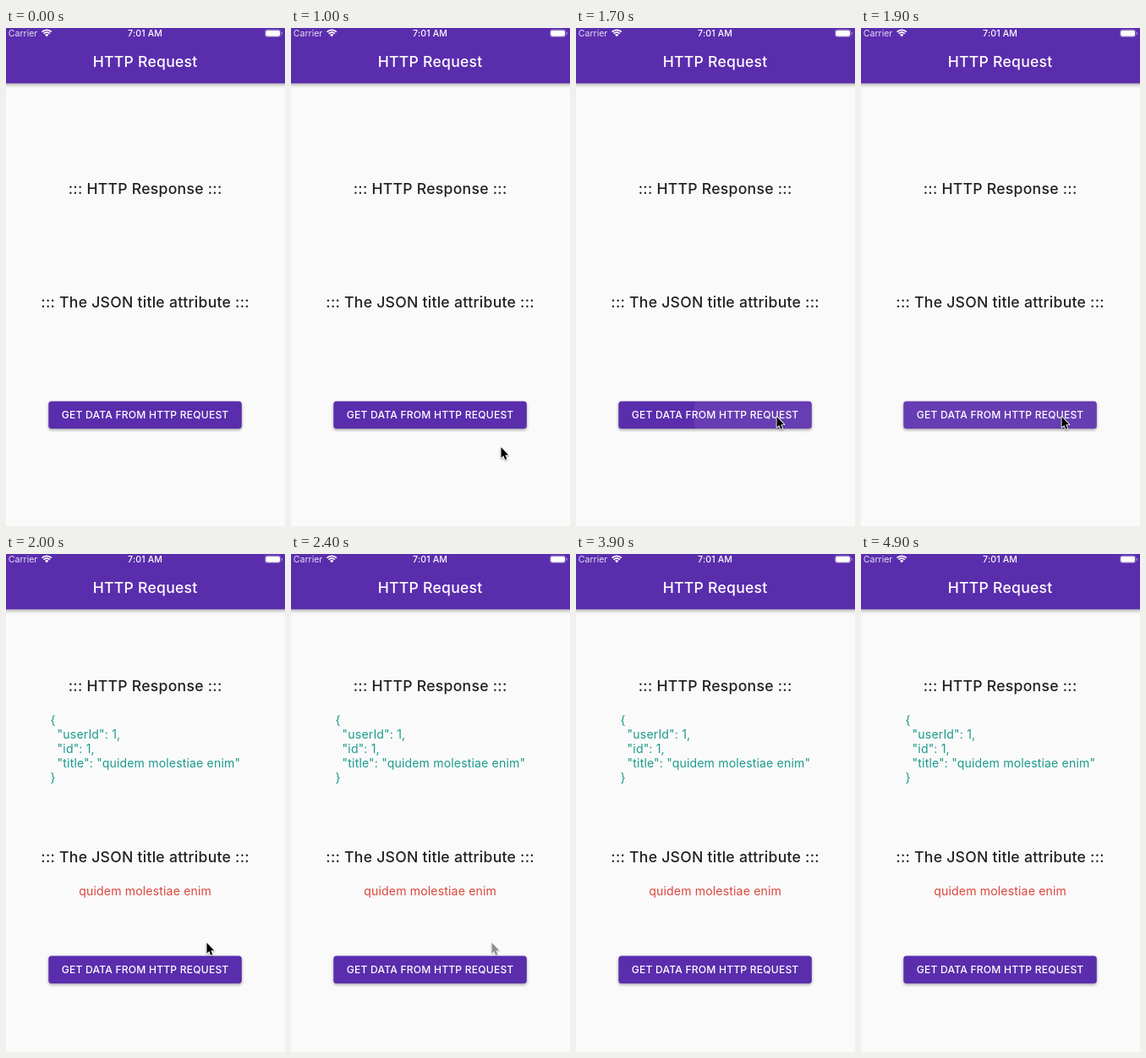
Write an HTML page with a canvas that moves like this. It is 330 px wide and 588 px high and loops after 5 s.

```html
<!DOCTYPE html>
<html lang="en">
<head>
<meta charset="utf-8">
<title>HTTP Request</title>
<style>
  html, body { margin: 0; width: 100%; height: 100%; overflow: hidden; background: #fafafa; }
  canvas { display: block; width: 330px; height: 588px; }
</style>
</head>
<body>
<canvas id="stage"></canvas>
<script>
const W = 330, H = 588, MID = 164.6, LOOP = 5000, STEP = 100;
const PURPLE = '#5a2dad', INK = '#212121', TEAL = '#1c9a8b', RED = '#dc463b';
const PRESS = 1500, RESPONSE = 2000;
const TITLE = 'quidem molestiae enim';
const JSON_LINES = ['{', '  "userId": 1,', '  "id": 1,', `  "title": "${TITLE}"`, '}'];

// Pointer tip as [time, x, y].
const POINTER = [
  [500, 342, 509], [600, 323, 509], [800, 282, 507], [900, 264, 503],
  [1000, 248.5, 495], [1100, 241.5, 478], [1200, 238.5, 465], [1300, 237.5, 459]
];

const canvas = document.getElementById('stage');
const ctx = canvas.getContext('2d');
const dpr = window.devicePixelRatio || 1;
canvas.width = W * dpr;
canvas.height = H * dpr;

const clamp = v => Math.max(0, Math.min(1, v));
const progress = (t, from, to) => clamp((t - from) / (to - from));

function text(str, x, y, { size, weight = 400, color = '#fff', spacing = 0, align = 'center' }) {
  ctx.font = `${weight} ${size}px Inter, "Open Sans", sans-serif`;
  ctx.letterSpacing = spacing + 'px';
  ctx.textAlign = align;
  ctx.fillStyle = color;
  ctx.fillText(str, x, y);
}

function box(x, y, w, h, r) {
  ctx.beginPath();
  ctx.roundRect(x, y, w, h, r);
}

function shadow(color, blur, dy) {
  ctx.shadowColor = color;
  ctx.shadowBlur = blur * dpr;
  ctx.shadowOffsetY = dy * dpr;
}

function drawWifi(x, y) {
  ctx.strokeStyle = ctx.fillStyle = '#fff';
  ctx.lineWidth = 1.7;
  for (const r of [5.2, 8]) {
    ctx.beginPath();
    ctx.arc(x, y, r, -Math.PI * 0.75, -Math.PI * 0.25);
    ctx.stroke();
  }
  ctx.beginPath();
  ctx.moveTo(x, y);
  ctx.arc(x, y, 3.1, -Math.PI * 0.75, -Math.PI * 0.25);
  ctx.fill();
}

function drawBattery() {
  ctx.strokeStyle = 'rgba(255,255,255,0.35)';
  ctx.lineWidth = 0.8;
  box(306.4, 1.9, 18.4, 8.6, 2.5);
  ctx.stroke();
  ctx.fillStyle = '#fff';
  box(307.2, 2.7, 16.8, 7, 1.7);
  ctx.fill();
  ctx.fillStyle = 'rgba(255,255,255,0.45)';
  box(325.7, 4.8, 1.2, 3, 0.6);
  ctx.fill();
}

function drawAppBar() {
  ctx.save();
  shadow('rgba(0,0,0,0.4)', 5, 1.8);
  ctx.fillStyle = PURPLE;
  ctx.fillRect(-10, -10, W + 20, 75.3);
  ctx.restore();
  text('Carrier', 2.8, 10, { size: 10.56, color: '#e6def3', align: 'left' });
  drawWifi(48.2, 10.3);
  text('7:01 AM', MID, 10, { size: 10.56, weight: 500, spacing: 0.15 });
  drawBattery();
  text('HTTP Request', MID, 46, { size: 17.6, weight: 500, spacing: 0.26 });
}

function drawButton(y, t) {
  ctx.save();
  shadow('rgba(0,0,0,0.38)', 3.5, 1.5);
  ctx.fillStyle = PURPLE;
  box(50.3, y, 228.5, 32.4, 3.5);
  ctx.fill();
  ctx.restore();

  const grow = progress(t, PRESS, 1900);
  if (grow > 0 && t < RESPONSE) {
    ctx.save();
    ctx.clip();
    ctx.fillStyle = `rgba(255,255,255,${0.08 * Math.min(1, grow * 2)})`;
    ctx.beginPath();
    ctx.arc(237, 458, 195 * grow, 0, Math.PI * 2);
    ctx.fill();
    ctx.restore();
  }
  text('GET DATA FROM HTTP REQUEST', MID, y + 20.5, { size: 12.1, weight: 500, spacing: 0.2 });
}

function pointerAt(t) {
  const next = POINTER.findIndex(p => p[0] > t);
  if (next < 0) return POINTER[POINTER.length - 1].slice(1);
  const [t0, x0, y0] = POINTER[Math.max(0, next - 1)];
  const [t1, x1, y1] = POINTER[next];
  const k = progress(t, t0, t1);
  return [x0 + (x1 - x0) * k, y0 + (y1 - y0) * k];
}

function drawPointer(t) {
  const alpha = 1 - progress(t, 2100, 2600);
  if (t < 600 || alpha === 0) return;
  ctx.save();
  ctx.globalAlpha = alpha;
  ctx.translate(...pointerAt(t));
  ctx.scale(0.87, 0.9);
  const arrow = new Path2D('M0 0V14L3.2 11.1L5.5 16.3L7.8 15.3L5.6 10.2H10Z');
  ctx.lineJoin = 'round';
  ctx.lineWidth = 2;
  ctx.strokeStyle = '#fff';
  ctx.save();
  shadow('rgba(0,0,0,0.35)', 2, 1);
  ctx.stroke(arrow);
  ctx.restore();
  ctx.fillStyle = '#000';
  ctx.fill(arrow);
  ctx.restore();
}

function draw(t) {
  ctx.setTransform(dpr, 0, 0, dpr, 0, 0);
  ctx.fillStyle = '#fafafa';
  ctx.fillRect(0, 0, W, H);
  drawAppBar();

  const loaded = t >= RESPONSE;
  const shift = loaded ? 33.8 : 0;
  const heading = { size: 17.6, weight: 500, color: INK, spacing: 0.26 };
  text('::: HTTP Response :::', MID, 195.5 - shift, heading);
  text('::: The JSON title attribute :::', MID, 330.2 + shift, heading);

  if (loaded) {
    const body = { size: 14.08, spacing: 0.15 };
    JSON_LINES.forEach((line, i) =>
      text(line, 52.4, 201 + i * 16.9, { ...body, color: TEAL, align: 'left' }));
    text(TITLE, MID, 403, { ...body, color: RED });
  }
  drawButton(440.7 + shift, t);
  drawPointer(t);
}

const start = performance.now();
function tick() {
  const t = (performance.now() - start) % LOOP;
  draw(Math.floor(t / STEP) * STEP);
  requestAnimationFrame(tick);
}
tick();
</script>
</body>
</html>
```
